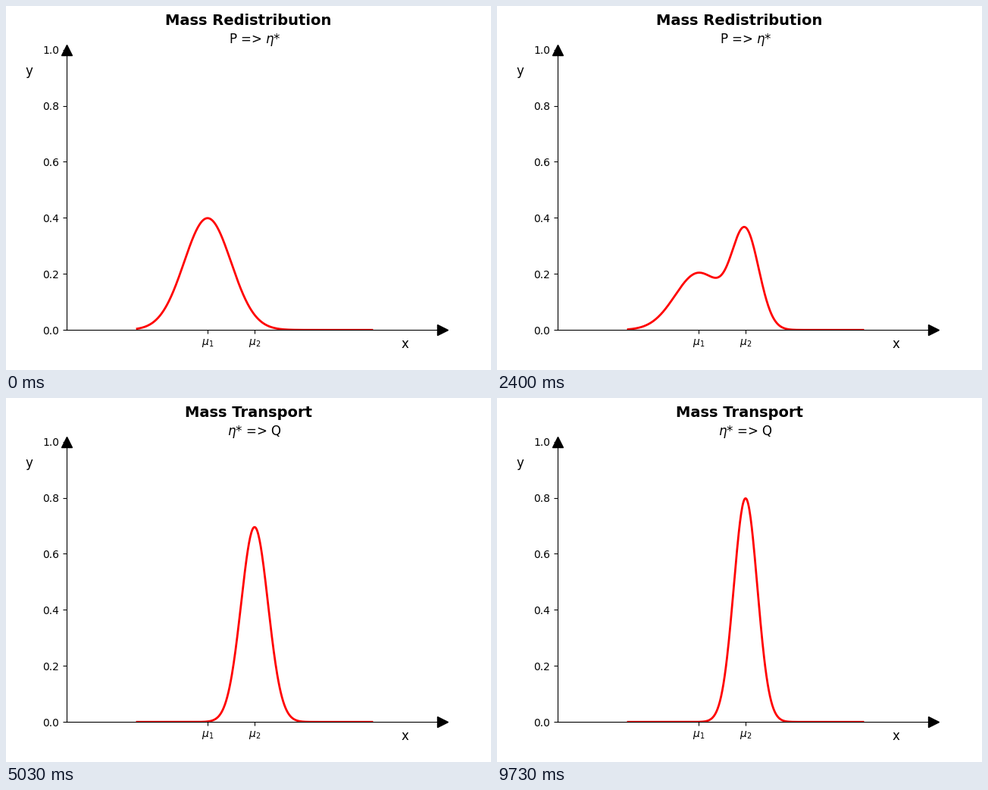
These frames come from a looping animation (640x480 px, 9830 ms). A matplotlib script:

```python
import numpy as np
import matplotlib.pyplot as plt
from matplotlib.animation import FuncAnimation
from matplotlib.markers import TICKDOWN, TICKLEFT
from matplotlib.transforms import ScaledTranslation

plt.rcParams["font.family"] = "DejaVu Sans"

LOOP = 9830      # ms
FRAMES = 491
STEP = LOOP / FRAMES
HOLD = 100       # ms each pose stays
SWITCH = 4930    # ms when the second phase takes over
LAST = 49        # steps in each phase

MU1, MU2 = 0, 2
X = np.linspace(-3, 7, 400)

TITLES = (
    ("Mass Redistribution", r"P => $\eta$*"),
    ("Mass Transport", r"$\eta$* => Q"),
)


def normal(mean, var):
    return np.exp(-(X - mean) ** 2 / (2 * var)) / np.sqrt(2 * np.pi * var)


P = normal(MU1, 1)
ETA = normal(MU2, 1 / 3)
Q = normal(MU2, 1 / 4)

fig = plt.figure(figsize=(6.4, 4.8), dpi=100, facecolor="white")
ax = fig.add_axes([0.125, 0.11, 0.775, 0.77])
ax.set_xlim(-6, 10)
ax.set_ylim(0, 1)
ax.spines[["top", "right"]].set_visible(False)

# Plain artists stand in for the axis ticks, which are slow to redraw.
ax.xaxis.set_visible(False)
ax.yaxis.set_visible(False)


def offset(x, y):
    """Data coordinates moved by x, y points."""
    return ax.transData + ScaledTranslation(x / 72, y / 72, fig.dpi_scale_trans)


def ticks(xs, ys, marker):
    ax.plot(xs, ys, ls="none", marker=marker, ms=3.5, mew=0.8,
            color="black", clip_on=False, zorder=2.6)


def arrow(x, y, marker):
    ax.plot(x, y, marker=marker, ms=10, color="black",
            transform=ax.transAxes, clip_on=False, zorder=2.7)


levels = np.arange(6) / 5
ticks(np.full(6, -6), levels, TICKLEFT)
ticks([MU1, MU2], [0, 0], TICKDOWN)
for level in levels:
    ax.text(-6, level, f"{level:.1f}", size=10, ha="right",
            va="center_baseline", transform=offset(-7, 0))
for mean, label in ((MU1, r"$\mu_1$"), (MU2, r"$\mu_2$")):
    ax.text(mean, 0, label, size=10, ha="center", va="top",
            transform=offset(0, -7))

arrow(1, 0, ">")
arrow(0, 1, "^")
ax.text(0.9, -0.0265, "x", size=12, ha="center", va="top",
        transform=ax.transAxes)
ax.text(-0.1, 0.9, "y", size=12, ha="center", va="bottom",
        transform=ax.transAxes)

heading = fig.text(0.5, 0.98, "", size=14, weight="bold",
                   ha="center", va="top")
subtitle = ax.text(2, 1, "", size=12, ha="center", va="baseline",
                   transform=offset(0, 6))
curve, = ax.plot(X, P, color="red", lw=2)


def update(k):
    # The end of the slot, so that no change comes late.
    t = (k + 1) * STEP - 0.01
    if t < SWITCH:
        phase, start, end = 0, P, ETA
        share = t // HOLD / LAST
    else:
        phase, start, end = 1, ETA, Q
        share = ((t - SWITCH) // HOLD + 1) / LAST
    curve.set_ydata((1 - share) * start + share * end)
    heading.set_text(TITLES[phase][0])
    subtitle.set_text(TITLES[phase][1])
    return curve, heading, subtitle


anim = FuncAnimation(fig, update, frames=FRAMES, interval=STEP,
                     repeat=True, repeat_delay=0, cache_frame_data=False)

plt.show()
```
